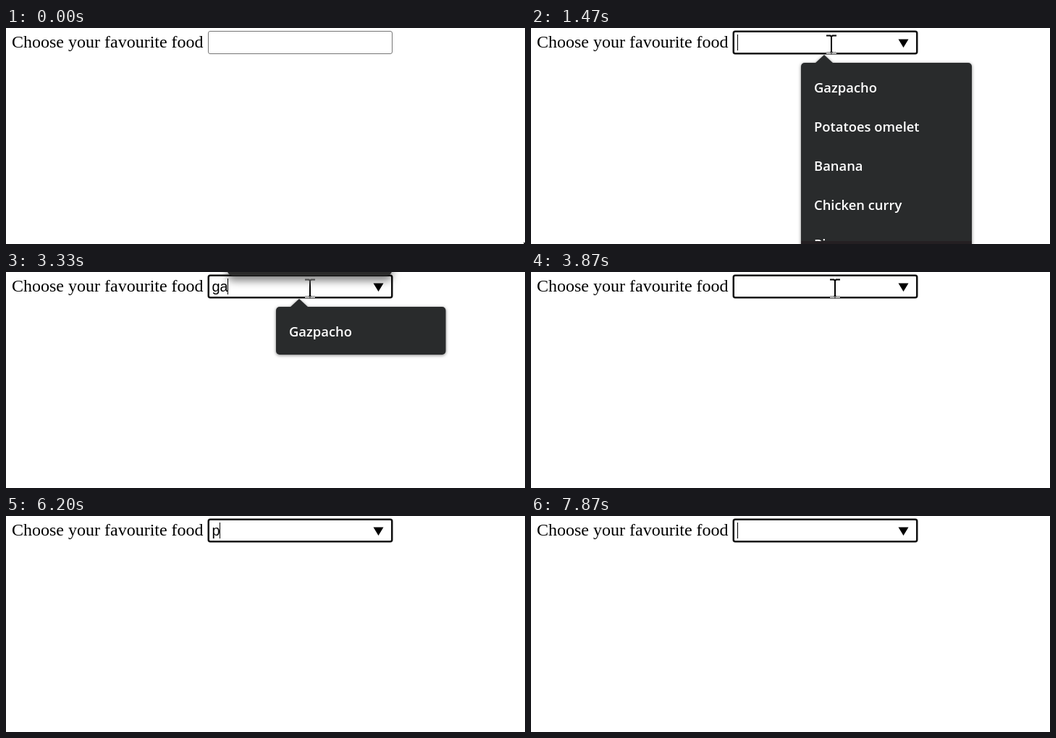
Write an HTML page that moves like this. It is 717 px wide and 298 px high and loops after 8 s.

```html
<!DOCTYPE html>
<html lang="en">
<head>
<meta charset="utf-8">
<title>Favourite food</title>
<style>
  html, body { margin: 0; width: 100%; height: 100%; overflow: hidden; background: #fff; }
  svg { display: block; width: 717px; height: 298px; }
  .label { font: 24px "Liberation Serif", serif; }
  .typed { font: 20px "Liberation Sans", sans-serif; }
  .item { font: 600 18.4px "Open Sans", "Noto Sans", sans-serif; fill: #fff; }
  #popup { filter: drop-shadow(0 1.5px 2px rgba(0, 0, 0, .5)); }
  #bar { filter: drop-shadow(0 7px 6px rgba(0, 0, 0, .5)); }
  #beam { mix-blend-mode: difference; }
</style>
</head>
<body>
<svg viewBox="0 0 717 298">
  <rect width="717" height="298" fill="#fff"/>
  <text class="label" x="8" y="27">Choose your favourite food</text>
  <rect id="field" fill="#fff"/>
  <path id="drop" d="M507.5 15.5h14l-7 11.5z"/>
  <text id="typed" class="typed" x="284.5" y="27"></text>
  <rect id="caret" y="9" width="1" height="22"/>
  <g id="popup">
    <path d="M392 49l13-12 13 12z" fill="#292b2c"/>
    <rect id="panel" x="373" y="48" rx="5" fill="#292b2c"/>
    <g id="items"></g>
  </g>
  <rect id="bar" y="-40" height="45" rx="7" fill="#2b2b2b"/>
  <path id="beam" d="M-7 -11.5h5.5l1.5 1.5l1.5 -1.5h5.5M0 -10.5v22M-7 12.5h5.5l1.5 -1.5l1.5 1.5h5.5"
        fill="none" stroke="#fff" stroke-width="2"/>
  <path id="arrow" d="M0 0v25.5l6 -5.5l4 8.500l4 -2l-4 -8h8z" fill="#fff" stroke="#000" stroke-width="1.2"/>
</svg>
<script>
const LOOP = 8000;
const FOODS = ["Gazpacho", "Potatoes omelet", "Banana", "Chicken curry", "Pizza"];
const $ = id => document.getElementById(id);

// Each step changes only the listed parts of the state.
const steps = [
  [0, { text: "", caret: 0, focus: 0, list: 0, bar: 0, mouse: [716, 296.5] }],
  [1130, { mouse: [418, 22] }],
  [1200, { mouse: [415, 22] }],
  [1400, { focus: 1, caret: 1 }],
  [1470, { list: 1 }],
  [1930, { caret: 0 }],
  [2200, { mouse: [420, 22] }],
  [2470, { caret: 1 }],
  [2870, { text: "g" }],
  [3070, { bar: [295, 634] }],
  [3130, { text: "ga" }],
  [3270, { bar: 0 }],
  [3330, { bar: [306, 533] }],
  [3670, { text: "g", bar: 0 }],
  [3870, { text: "", caret: 0, list: 0 }],
  [4200, { caret: 1 }],
  [4730, { caret: 0, mouse: [415, 19] }],
  [4800, { mouse: [407, 18] }],
  [5070, { text: "f", caret: 1 }],
  [5270, { bar: [290, 591], mouse: [405, 30] }],
  [5530, { bar: 0, mouse: [412, 22] }],
  [5600, { text: "", mouse: [420, 22] }],
  [5800, { mouse: [427, 30] }],
  [5870, { mouse: [392, 22] }],
  [5930, { mouse: [357, 14] }],
  [6130, { caret: 0, mouse: 0 }],
  [6200, { text: "p", caret: 1 }],
  [6270, { list: 1 }],
  [6400, { text: "pi" }],
  [6600, { bar: [300, 565] }],
  [6930, { caret: 0 }],
  [7130, { text: "p", caret: 1, bar: 0 }],
  [7470, { caret: 0 }],
  [7870, { text: "", caret: 1, list: 0 }]
];

function set(el, attrs) {
  for (const key in attrs) el.setAttribute(key, attrs[key]);
}
function show(el, on) {
  el.setAttribute("visibility", on ? "visible" : "hidden");
}

function stateAt(t) {
  const state = {};
  for (const [start, change] of steps) if (t >= start) Object.assign(state, change);
  if (t >= 270 && t < 1130) {
    const k = Math.min(13, Math.floor((t - 270) / 66.6) + 1) / 13;
    const e = k * k * (3 - 2 * k);
    state.mouse = [716 - 300 * e, 296.5 - 274.5 * e];
  }
  return state;
}

let listed = "";
function drawList(text) {
  const found = FOODS.filter(food => food.toLowerCase().includes(text));
  const key = found.join();
  if (key === listed) return;
  listed = key;
  const full = found.length === FOODS.length;
  set($("panel"), { width: full ? 236 : 234.5, height: found.length * 54 + 12 });
  $("items").innerHTML = found.map((food, i) =>
    `<text class="item" x="391" y="${89 + i * 54}">${food}</text>`).join("") +
    (full ? '<rect x="373" y="294" width="236" height="4" fill="#241f22"/>' : "");
}

function drawField(focus, hover) {
  set($("field"), focus
    ? { x: 279.75, y: 4.75, width: 253.5, height: 30.5, rx: 2.5, stroke: "#101010", "stroke-width": 2.5 }
    : { x: 279.5, y: 4.5, width: 254, height: 31, rx: 2.5, stroke: hover ? "#4f4f4f" : "#767676", "stroke-width": 1 });
  show($("drop"), focus || hover);
}

function drawMouse(mouse, hover) {
  show($("beam"), mouse && hover);
  show($("arrow"), mouse && !hover);
  if (!mouse) return;
  const [x, y] = mouse.map(Math.round);
  set($("beam"), { transform: `translate(${x} ${y})` });
  set($("arrow"), { transform: `translate(${mouse})` });
}

function draw(t) {
  const { text, caret, focus, list, bar, mouse } = stateAt(t);
  const hover = mouse && mouse[0] > 279 && mouse[0] < 534 && mouse[1] < 36;
  drawField(focus, hover);
  drawMouse(mouse, hover);

  const typed = $("typed");
  if (typed.textContent !== text) typed.textContent = text;
  const end = text ? Math.floor(284.5 + typed.getComputedTextLength()) : 285;
  set($("caret"), { x: end });
  show($("caret"), caret);

  show($("popup"), list);
  if (list) drawList(text);
  show($("bar"), bar);
  if (bar) set($("bar"), { x: bar[0], width: bar[1] - bar[0] });
}

const began = performance.now();
function tick() {
  draw((performance.now() - began) % LOOP);
  requestAnimationFrame(tick);
}
tick();
</script>
</body>
</html>
```
